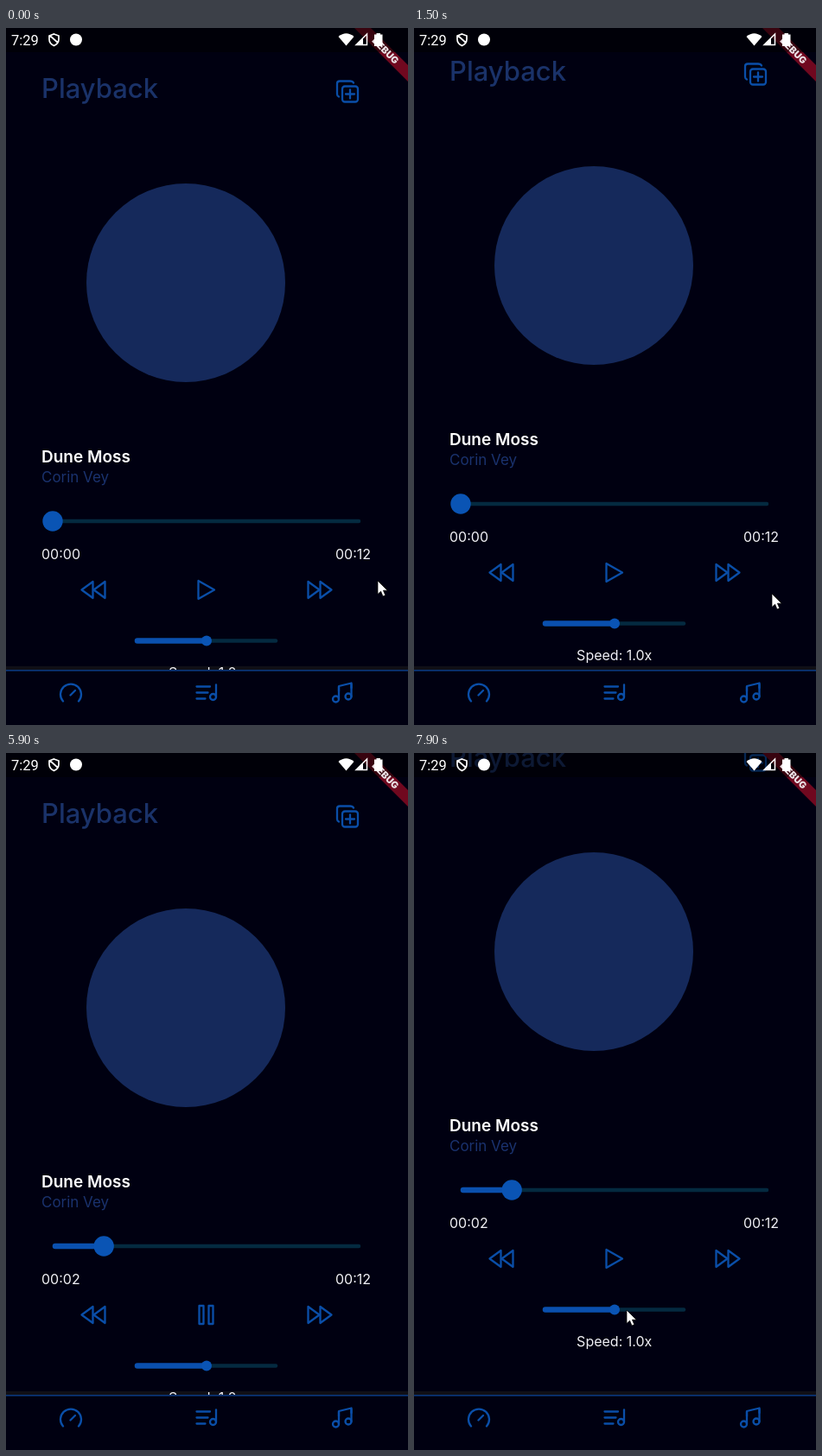
An HTML page that plays this animation: 465x807 px, repeating every 8 s.

```html
<!DOCTYPE html>
<html lang="en">
<meta charset="utf-8">
<title>Player</title>
<style>
  html, body { margin: 0; overflow: hidden; background: #000011; }
  svg { display: block; width: 465px; height: 807px; font-family: Inter, sans-serif; }
  .icon { fill: none; stroke: #0a4ea8; stroke-width: 2.3; stroke-linecap: round; stroke-linejoin: round; }
  .rail { stroke: #042a40; stroke-width: 4.5; stroke-linecap: round; }
  .fill { stroke: #0a50ae; stroke-width: 6.5; stroke-linecap: round; }
  .knob { fill: #0a54b4; }
  .label { fill: #f0f0f4; font-size: 16px; }
</style>

<svg viewBox="0 0 465 807">
  <defs>
    <path id="arrow" d="M-6.500 -9.500V9.500L6.500 0Z"/>
    <g id="skip"><use href="#arrow" x="-7"/><use href="#arrow" x="7"/></g>
    <g id="note"><circle r="3.500"/><path d="M3.500 0V-14"/></g>
  </defs>
  <rect width="465" height="807" fill="#000011"/>
  <rect y="739" width="465" height="4" fill="#101017"/>

  <g id="page">
    <text x="41" y="81" font-size="31" font-weight="500" fill="#1a3269">Playback</text>
    <g class="icon" transform="translate(398 76.500)">
      <rect x="-9" y="-9" width="18" height="18" rx="3"/>
      <path d="M-5 0H5M0 -5V5M-13 3Q-15 2 -15 0V-12Q-15 -15 -12 -15H0Q3 -15 4 -13"/>
    </g>

    <circle cx="208" cy="295" r="115" fill="#15295b"/>

    <text x="41" y="503" font-size="19" font-weight="600" fill="#fff">Dune Moss</text>
    <text x="41" y="526" font-size="17" fill="#1a326e">Corin Vey</text>

    <path class="rail" d="M56 571H408"/>
    <path class="fill" id="played"/>
    <circle class="knob" id="knob" cy="571" r="11.700"/>
    <text class="label" x="41" y="614.500" id="elapsed"></text>
    <text class="label" x="422" y="614.500" text-anchor="end">00:12</text>

    <g class="icon">
      <use href="#skip" transform="translate(101 650.500) scale(-1 1)"/>
      <use href="#skip" x="363" y="650.500"/>
      <path id="play" d="M222.500 640V661L241 650.500Z"/>
      <path id="pause" d="M223.500 640h5v21h-5zm11 0h5v21h-5z"/>
    </g>

    <path class="rail" d="M152 709.500H312"/>
    <path class="fill" d="M152 709.500H232"/>
    <circle class="knob" cx="232" cy="709.500" r="6"/>
    <text class="label" x="231.700" y="751.500" text-anchor="middle">Speed: 1.0x</text>
  </g>

  <!-- navigation bar -->
  <rect y="743" width="465" height="64" fill="#000011"/>
  <rect y="743" width="465" height="1.700" fill="#0a3577"/>
  <g class="icon">
    <path d="M66 779.500A12 12 0 1 1 84 779.500M74.500 772.500L80 767"/>
    <path d="M220.500 762.500h15.500m-15.500 7h13m-13 7h10"/>
    <use href="#note" x="239.500" y="774.500"/>
    <use href="#note" x="381.500" y="777"/>
    <use href="#note" x="396" y="774"/>
    <path d="M385 768V762L399.500 758.500V764"/>
  </g>

  <!-- debug ribbon and status bar -->
  <path d="M403 0H422L465 43V62Z" fill="#70081f"/>
  <rect width="465" height="28" opacity=".5"/>
  <text transform="translate(439 26) rotate(45)" y="4" font-size="11" font-weight="900" text-anchor="middle" fill="#eadfe3">DEBUG</text>
  <g fill="#fff">
    <text x="6" y="20" font-size="16.500" style="font-family: Roboto, sans-serif">7:29</text>
    <path d="M55.500 7L61 9V13Q61 18 55.500 20.500Q50 18 50 13V9ZM51 9L60 17" fill="none" stroke="#fff" stroke-width="1.700"/>
    <circle cx="81" cy="13.500" r="7"/>
    <path d="M384.500 10Q393.500 2.500 402.500 10L393.500 20.500Z"/>
    <path d="M405 19.500L417.500 7V19.500Z" fill="none" stroke="#fff" stroke-width="1.500"/>
    <path d="M405 20L413 12V20Z"/>
    <path d="M428.500 6H433V7.500H435.500V21H426V7.500H428.500Z"/>
  </g>

  <path id="cursor" d="M0 0V15.500L3.600 12.200L6 18L8.800 16.800L6.400 11.200H11.200Z" fill="#fff" stroke="#000" stroke-width=".7"/>
</svg>

<script>
  const LOOP = 8000, STEP = 100, SONG = 12, MAX_SCROLL = 65;
  const PLAY = 3800, PAUSE = 6500;
  const el = id => document.getElementById(id);
  const show = (id, on) => el(id).setAttribute('visibility', on ? 'visible' : 'hidden');
  const linear = (t, from, to) => Math.min(1, Math.max(0, (t - from) / (to - from)));
  const smooth = (t, from, to) => {
    const p = linear(t, from, to);
    return p * p * (3 - 2 * p);
  };

  function draw(now) {
    const t = Math.floor(now % LOOP / STEP) * STEP;
    const playing = t >= PLAY && t < PAUSE;
    const seconds = Math.floor((Math.min(PAUSE, Math.max(PLAY, t)) - PLAY) / 1000);

    // The page follows three drags: a flick up, a pull back in two parts, a last drag up.
    const flick = smooth(t, 100, 600), pull = linear(t, 600, 1500), settle = smooth(t, 1700, 2200);
    const toPlay = smooth(t, 2800, 3600), away = smooth(t, 6600, 7100), aim = smooth(t, 7200, 7400);
    const lift = smooth(t, 7400, 7900);
    const scroll = MAX_SCROLL * (flick + lift) - 45 * pull - 20 * settle;
    const cursorX = 430 - 16 * linear(t, 0, 1500) - 14 * settle - 166 * toPlay + 97 * away - 79 * aim - 6 * lift;
    const cursorY = 640 - 29 * flick + 44 * pull + 40 * settle - 47 * toPlay - 5 * away
      + MAX_SCROLL * aim - 63 * lift;

    const knobX = 54 + 355 * seconds / SONG;
    el('page').setAttribute('transform', `translate(0 ${-scroll})`);
    el('cursor').setAttribute('transform', `translate(${cursorX} ${cursorY})`);
    el('knob').setAttribute('cx', knobX);
    el('played').setAttribute('d', `M57 571H${Math.max(57, knobX)}`);
    el('elapsed').textContent = '00:0' + seconds;
    show('play', !playing);
    show('pause', playing);
    show('cursor', t < 3600 || t >= 6800);
    requestAnimationFrame(draw);
  }
  draw(performance.now());
</script>
</html>
```
